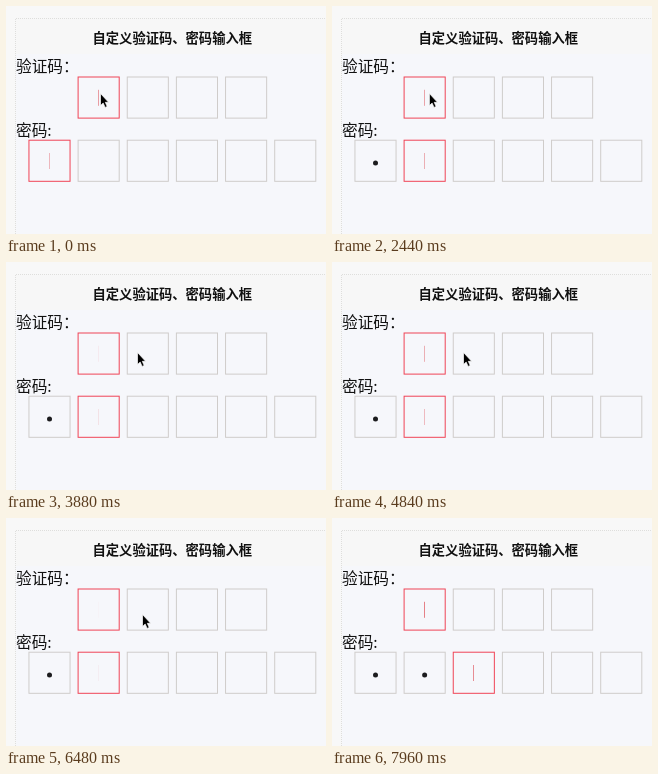
An HTML page for the animation above (8 s loop, 320 by 228 pixels).

```html
<!DOCTYPE html>
<html lang="zh">
<head>
<meta charset="utf-8">
<title>验证码、密码输入框</title>
<style>
html, body { margin: 0; width: 100%; height: 100%; overflow: hidden; background: #f8f8f8; }
svg { display: block; width: 320px; height: 228px; }
text { font-family: "Noto Sans CJK SC", "Noto Sans CJK", sans-serif; font-size: 15.7px; font-weight: 500; fill: #111; }
.title { font-size: 13.3px; font-weight: 700; }
.edge { fill: none; stroke: #dededc; stroke-dasharray: 1 1; }
.cell { fill: none; stroke: #cfccca; }
.cell.focus { stroke: #f04456; }
.caret { fill: #e57f86; }
.dot { fill: #1c1c1e; }
</style>
</head>
<body>
<svg viewBox="0 0 320 228">
  <rect width="320" height="228" fill="#f8f8f8"/>
  <rect x="10" y="13" width="310" height="35" fill="#f7f7f7"/>
  <rect x="10" y="48" width="310" height="180" fill="#f6f7fb"/>
  <path class="edge" d="M9.5 228V12.5H320"/>
  <text class="title" x="86.5" y="37">自定义验证码、密码输入框</text>
  <text x="10" y="66">验证码：</text>
  <text x="10" y="129.5">密码:</text>
  <g id="cells"></g>
  <path id="pointer" d="M.5 .5V12.5L3.2 10.1L5.1 14.4L7.2 13.5L5.3 9.3H8.6Z"
        fill="#000" stroke="#fff" stroke-width=".7" stroke-linejoin="round"/>
</svg>
<script>
const LOOP = 8000, BLINK = 2480, PITCH = 49.15, SIZE = 41.1;
const KEYS = [1740, 7000];                 // key presses in the password row
const LOW = [1840 - BLINK, 1740, 7000];    // when each password caret is invisible
const CODE_LOW = 1660 - BLINK;
const PATH = [[0, 94, 87], [2420, 94, 87], [2440, 96.7, 87], [2760, 131, 90],
              [6200, 131, 90], [6440, 136, 96]];

const cells = document.getElementById('cells');
const pointer = document.getElementById('pointer');

function add(tag, attrs) {
  const el = document.createElementNS('http://www.w3.org/2000/svg', tag);
  for (const name in attrs) el.setAttribute(name, attrs[name]);
  return cells.appendChild(el);
}

function makeRow(count, x, y) {
  return Array.from({ length: count }, (_, i) => {
    const left = x + i * PITCH, mid = left + SIZE / 2;
    return {
      box: add('rect', { class: 'cell', x: left, y, width: SIZE, height: SIZE }),
      caret: add('rect', { class: 'caret', x: Math.floor(mid), y: y + 12.8, width: 1, height: 16 }),
      dot: add('circle', { class: 'dot', cx: mid, cy: y + 22.8, r: 2.5 })
    };
  });
}

const code = makeRow(4, 72.1, 71);
const password = makeRow(6, 22.95, 134.2);

const blink = (t, low) => (1 - Math.cos((t - low) / BLINK * 2 * Math.PI)) / 2;

function drawRow(row, typed, opacity) {
  row.forEach((cell, i) => {
    cell.box.classList.toggle('focus', i === typed);
    cell.caret.style.opacity = i === typed ? opacity : 0;
    cell.dot.style.opacity = i < typed ? 1 : 0;
  });
}

function position(t) {
  const next = PATH.findIndex(p => p[0] > t);
  if (next < 0) return PATH[PATH.length - 1].slice(1);
  const [t0, x0, y0] = PATH[next - 1], [t1, x1, y1] = PATH[next];
  const k = (t - t0) / (t1 - t0), e = k * (2 - k);
  return [x0 + (x1 - x0) * e, y0 + (y1 - y0) * e];
}

function draw(t) {
  const typed = KEYS.filter(key => t >= key).length;
  drawRow(code, 0, blink(t, CODE_LOW));
  drawRow(password, typed, blink(t, LOW[typed]));

  // typing hides the pointer until the mouse moves again
  const hidden = t >= KEYS[1] || (t >= KEYS[0] && t < 2440);
  pointer.style.opacity = hidden ? 0 : 1;
  pointer.setAttribute('transform', `translate(${position(t)})`);
}

const start = performance.now();
function tick() {
  draw((performance.now() - start) % LOOP);
  requestAnimationFrame(tick);
}
tick();
</script>
</body>
</html>
```
